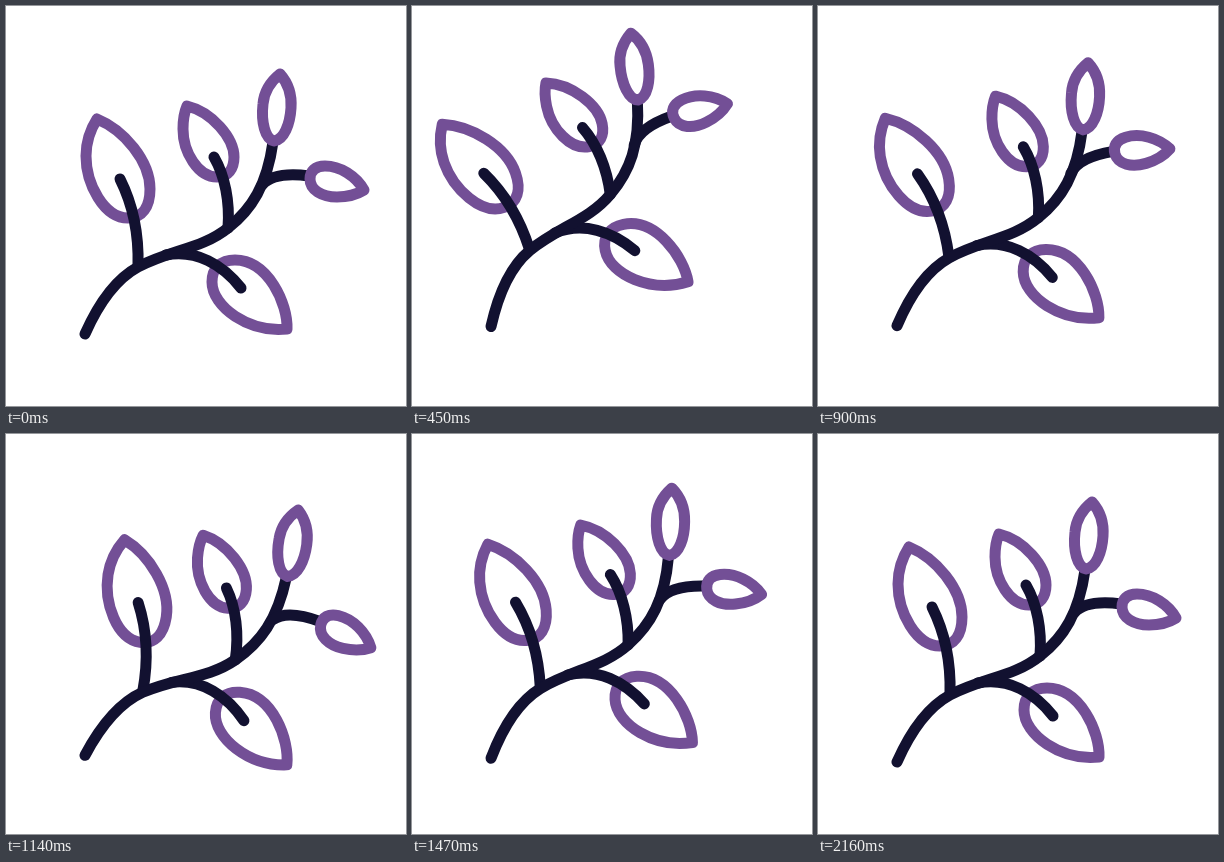
An HTML page that plays this animation: 400x400 px, repeating every 4.19 s.

```html
<!DOCTYPE html>
<html lang="en">
<head>
<meta charset="utf-8">
<title>Swaying branch</title>
<style>
  html, body { margin: 0; width: 100%; height: 100%; overflow: hidden; background: #fff; }
  svg { display: block; width: 100%; height: 100%; }
  path { fill: none; stroke-width: 11; stroke-linecap: round; stroke-linejoin: round; }
  .wood { stroke: #121130; }
  .leaf { stroke: #734f96; }
</style>
</head>
<body>
<svg viewBox="0 0 400 400">
  <g id="plant">
    <g id="left">
      <path class="leaf" d="M91 113C118 124 144 155 144 183C144 201 136 212 122 212C98 212 80 178 80 150C80 136 84 124 91 113Z"/>
      <path class="wood" d="M132 260C133 228 126 197 114 173"/>
    </g>
    <path class="leaf" d="M181 100C206 106 228 132 228 151C228 163 222 171 211 171C192 171 177 146 177 123C177 114 178 107 181 100Z"/>
    <path class="leaf" d="M281 323C282 298 262 254 229 254C215 254 206 262 206 276C206 301 243 327 281 323Z"/>
    <path class="wood" d="M222 222C224 196 219 170 208 151"/>
    <path class="wood" d="M160 249C190 243 217 259 235 282"/>
    <path class="wood" d="M79 328C91 301 108 274 132 261C164 244 196 243 222 222C246 203 261 179 267 136"/>
    <g id="right">
      <path class="wood" d="M256 179C264 170 280 167 303 170"/>
      <path class="leaf" d="M358 184C350 170 334 160 319 160C309 160 304 165 304 173C304 184 316 191 331 191C341 191 350 189 358 184Z"/>
    </g>
    <path class="leaf" d="M274 68C282 77 286 88 285 102C284 118 278 134 268 135C259 133 255 116 257 98C258 86 264 76 274 68Z"/>
  </g>
</svg>
<script>
  const LOOP = 4190;
  const LAG = 110; // side shoots trail the main stem
  const [plant, left, right] = ['plant', 'left', 'right'].map(id => document.getElementById(id));

  const ease = u => (1 - Math.cos(Math.PI * Math.min(Math.max(u, 0), 1))) / 2;
  const glide = (t, from, to) => ease((t - from) / (to - from));

  // Turning points of the fading swing: time in ms, angle in degrees
  const turns = [[0, 0], [630, -14], [1060, 4.8], [1490, -3.1], [1890, 1], [2050, 0]];

  const sway = t => turns.slice(1).reduce((angle, [time, value], i) => {
    const [start, previous] = turns[i];
    return angle + (value - previous) * glide(t, start, time);
  }, 0);

  const lift = t => -9 * (glide(t, 0, 620) - glide(t, 620, 2160));

  function draw(t) {
    const trailing = sway(t - LAG);
    plant.setAttribute('transform', `translate(0 ${lift(t)}) rotate(${sway(t)} 79 328)`);
    left.setAttribute('transform', `rotate(${trailing} 132 260)`);
    right.setAttribute('transform', `rotate(${trailing * 1.95} 254 182)`);
  }

  const begin = performance.now();
  function tick() {
    draw((performance.now() - begin) % LOOP);
    requestAnimationFrame(tick);
  }
  tick();
</script>
</body>
</html>
```
